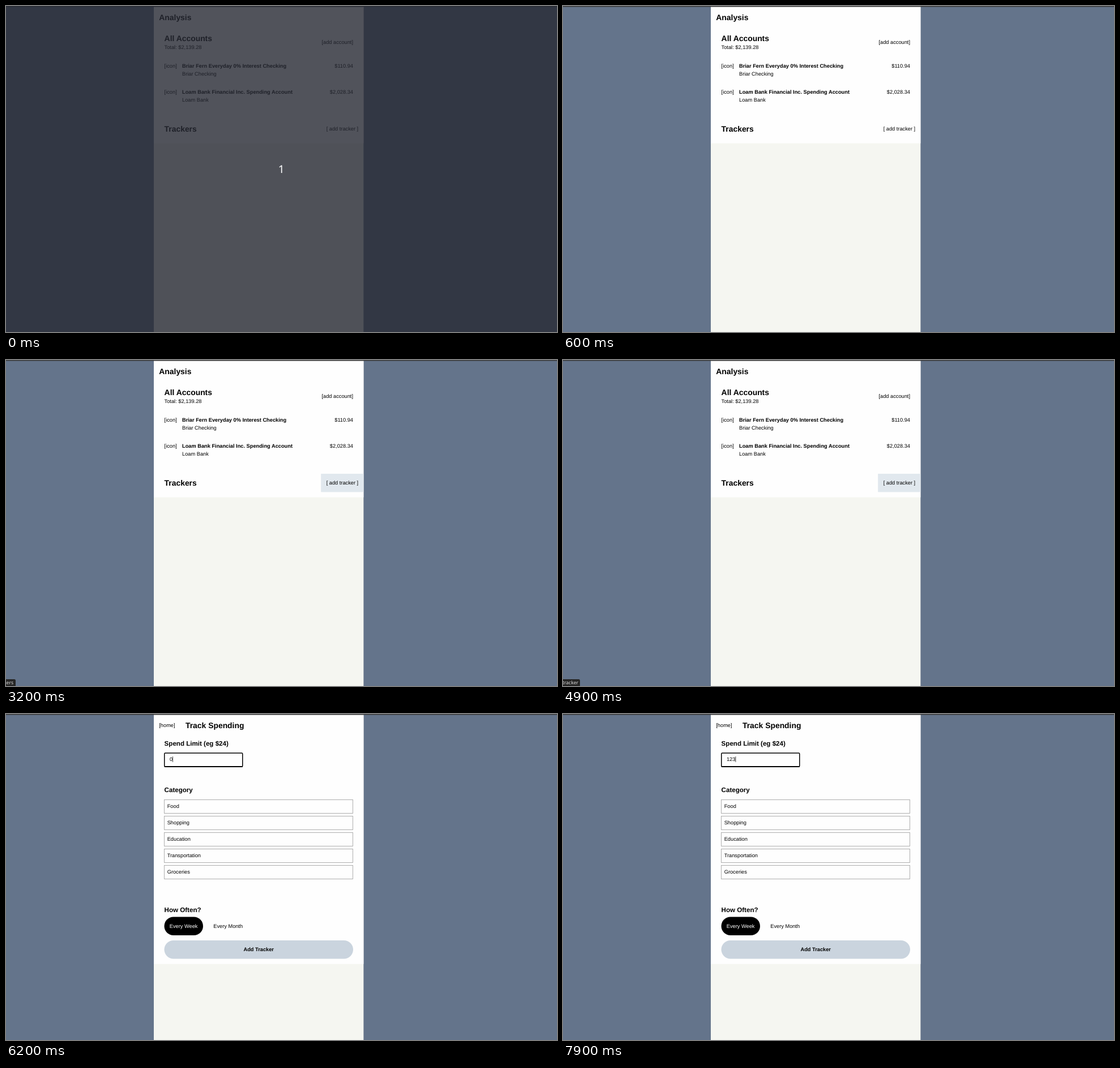
Recreate the animation shown at these times as an HTML page. Size 973 by 576 pixels, loop 8 s.

```html
<!DOCTYPE html>
<html lang="en">
<head>
<meta charset="utf-8">
<title>Spending tracker demo</title>
<style>
  html, body { margin: 0; width: 100%; height: 100%; overflow: hidden; background: #64748b; }
  svg { display: block; width: 973px; height: 576px; }
  text { font: 9.267px "Liberation Sans", Arial, sans-serif; text-rendering: geometricPrecision; white-space: pre; }
  .b { font-weight: bold; }
  .h1 { font-weight: bold; font-size: 13.9px; }
  .h2 { font-weight: bold; font-size: 11.58px; }
  .end { text-anchor: end; }
  .mid { text-anchor: middle; }
  .paper { fill: #fefefe; }
  .hover { fill: #e1e8ee; }
  .option { fill: #fefefe; stroke: #a6a6a6; stroke-width: .9; }
  .tip text { font: 8.5px "Noto Sans", sans-serif; fill: #ddd; text-anchor: end; }
  .tip path { fill: #262626; }
  .count { font: 19px "Noto Sans", sans-serif; fill: #fff; text-anchor: middle; }

  /* timed parts stay hidden outside their window; 1.25% is 100 ms */
  .t { opacity: 0; animation: 8s step-end infinite; }
  #countdown { animation-name: countdown; }
  #home { animation-name: home; }
  #form { animation-name: form; }
  #rowHover { animation-name: row-hover; }
  #listHover { animation-name: list-hover; }
  #addHover { animation-name: add-hover; }
  #listTip { animation-name: list-tip; }
  #addTip { animation-name: add-tip; }
  #focus { animation-name: focus; }
  #zero { animation-name: zero; }
  #d1 { animation-name: d1; }
  #d2 { animation-name: d2; }
  #d3 { animation-name: d3; }
  #addTipText { animation: tip-text 8s step-end infinite; }
  #caret { animation: caret 8s step-end infinite; }
  #submit { animation: submit 8s step-end infinite; }

  @keyframes countdown { 0% { opacity: 1 } 1.25%, 100% { opacity: 0 } }
  @keyframes home { 0% { opacity: 1 } 63.75%, 100% { opacity: 0 } }
  @keyframes form { 0% { opacity: 0 } 63.75%, 100% { opacity: 1 } }
  @keyframes row-hover { 0% { opacity: 0 } 6.25% { opacity: 1 } 7.5%, 100% { opacity: 0 } }
  @keyframes list-hover { 0% { opacity: 0 } 11.25% { opacity: 1 } 40%, 100% { opacity: 0 } }
  @keyframes add-hover { 0% { opacity: 0 } 40%, 100% { opacity: 1 } }
  @keyframes list-tip { 0% { opacity: 0 } 15% { opacity: .5 } 16.25% { opacity: 1 } 41.25%, 100% { opacity: 0 } }
  @keyframes add-tip {
    0% { opacity: 0 } 41.25% { opacity: 1 }
    67.5% { opacity: .67 } 68.75% { opacity: .33 } 70%, 100% { opacity: 0 }
  }
  @keyframes tip-text { 0% { opacity: .85 } 61.25%, 100% { opacity: 1 } }
  @keyframes focus { 0% { opacity: 0 } 77.5%, 100% { opacity: 1 } }
  @keyframes zero { 0% { opacity: 1 } 78.75%, 100% { opacity: 0 } }
  @keyframes d1 { 0% { opacity: 0 } 86.25%, 100% { opacity: 1 } }
  @keyframes d2 { 0% { opacity: 0 } 92.5%, 100% { opacity: 1 } }
  @keyframes d3 { 0% { opacity: 0 } 98.75%, 100% { opacity: 1 } }
  @keyframes caret {
    0% { transform: translateX(5.15px) }
    78.75% { transform: none }
    86.25% { transform: translateX(5.15px) }
    92.5% { transform: translateX(10.3px) }
    98.75%, 100% { transform: translateX(15.45px) }
  }
  @keyframes submit { 0% { fill: #000 } 78.75% { fill: #64748b } 86.25%, 100% { fill: #000 } }
</style>
</head>
<body>
<svg viewBox="0 0 973 576">
  <rect width="973" height="576" fill="#64748b"/>
  <rect x="261" width="370.4" height="576" fill="#f5f6f1"/>

  <g id="home" class="t">
    <rect class="paper" x="261" width="370.4" height="242.6"/>
    <rect id="rowHover" class="t hover" x="261" y="89.7" width="370.4" height="46.3"/>
    <rect id="listHover" class="t hover" x="261" y="201" width="295.2" height="32.3"/>
    <rect id="addHover" class="t hover" x="556.2" y="201" width="75.2" height="32.3"/>

    <text class="h1" x="270.3" y="24.8">Analysis</text>
    <text class="h1" x="279.6" y="61.9">All Accounts</text>
    <text x="279.6" y="76.4">Total: $2,139.28</text>
    <text class="end" x="613" y="67.2">[add account]</text>

    <text x="279.6" y="108.9">[icon]</text>
    <text class="b" x="311" y="108.9">Briar Fern Everyday 0% Interest Checking</text>
    <text x="311" y="122.8">Briar Checking</text>
    <text class="end" x="613" y="108.9">$110.94</text>

    <text x="279.6" y="155.2">[icon]</text>
    <text class="b" x="311" y="155.2">Loam Bank Financial Inc. Spending Account</text>
    <text x="311" y="169.1">Loam Bank</text>
    <text class="end" x="613" y="155.2">$2,028.34</text>

    <text class="h1" x="279.6" y="221.8">Trackers</text>
    <text class="end" x="622.2" y="220.2">[ add tracker ]</text>
  </g>

  <g id="form" class="t">
    <rect class="paper" x="261" width="370.4" height="441.7"/>
    <text x="270.3" y="23.2">[home]</text>
    <text class="h1" x="317" y="24.8">Track Spending</text>

    <text class="h2" x="279.6" y="55.6">Spend Limit (eg $24)</text>
    <path d="M279.6 92.8H418" stroke="#000" stroke-width="1.2"/>
    <text id="zero" class="t" x="288.9" y="83.4">0</text>
    <text id="d1" class="t" x="288.9" y="83.4">1</text>
    <text id="d2" class="t" x="294.05" y="83.4">2</text>
    <text id="d3" class="t" x="299.2" y="83.4">3</text>
    <g id="focus" class="t">
      <rect x="279.75" y="69.1" width="138" height="24" rx="1.5" fill="none" stroke="#000" stroke-width="1.5"/>
      <path d="M280 92.9H417.5" stroke="#000" stroke-width="2"/>
      <rect id="caret" x="288.8" y="75" width=".8" height="10"/>
    </g>

    <text class="h2" x="279.6" y="138">Category</text>
    <rect class="option" x="279.5" y="151.5" width="333" height="24"/>
    <rect class="option" x="279.5" y="180.5" width="333" height="24"/>
    <rect class="option" x="279.5" y="209.5" width="333" height="24"/>
    <rect class="option" x="279.5" y="238.5" width="333" height="24"/>
    <rect class="option" x="279.5" y="267.5" width="333" height="24"/>
    <text x="284.7" y="166.3">Food</text>
    <text x="284.7" y="195.3">Shopping</text>
    <text x="284.7" y="224.3">Education</text>
    <text x="284.7" y="253.3">Transportation</text>
    <text x="284.7" y="282.2">Groceries</text>

    <text class="h2" x="279.6" y="349.8">How Often?</text>
    <rect x="279.5" y="358.5" width="68.5" height="32.4" rx="16.2"/>
    <text x="288.8" y="377.8" fill="#fff">Every Week</text>
    <text x="366.3" y="377.8">Every Month</text>
    <rect x="279.5" y="400.1" width="333.5" height="32.4" rx="16.2" fill="#cad4de"/>
    <text id="submit" class="b mid" x="446.2" y="419.4">Add Tracker</text>
  </g>

  <rect width="973" height="1.6" fill="#3c3c3c"/>

  <g id="listTip" class="t tip">
    <path d="M0 564H14.5Q17 564 17 566.5V576H0Z"/>
    <text x="13" y="573.2">trackers</text>
  </g>
  <g id="addTip" class="t tip">
    <path d="M0 564H27.5Q30 564 30 566.5V576H0Z"/>
    <text id="addTipText" x="27" y="573.2">tracker</text>
  </g>

  <g id="countdown" class="t">
    <rect width="973" height="576" fill="#262932" fill-opacity=".8"/>
    <text class="count" x="486.3" y="295">1</text>
  </g>
</svg>
</body>
</html>
```
